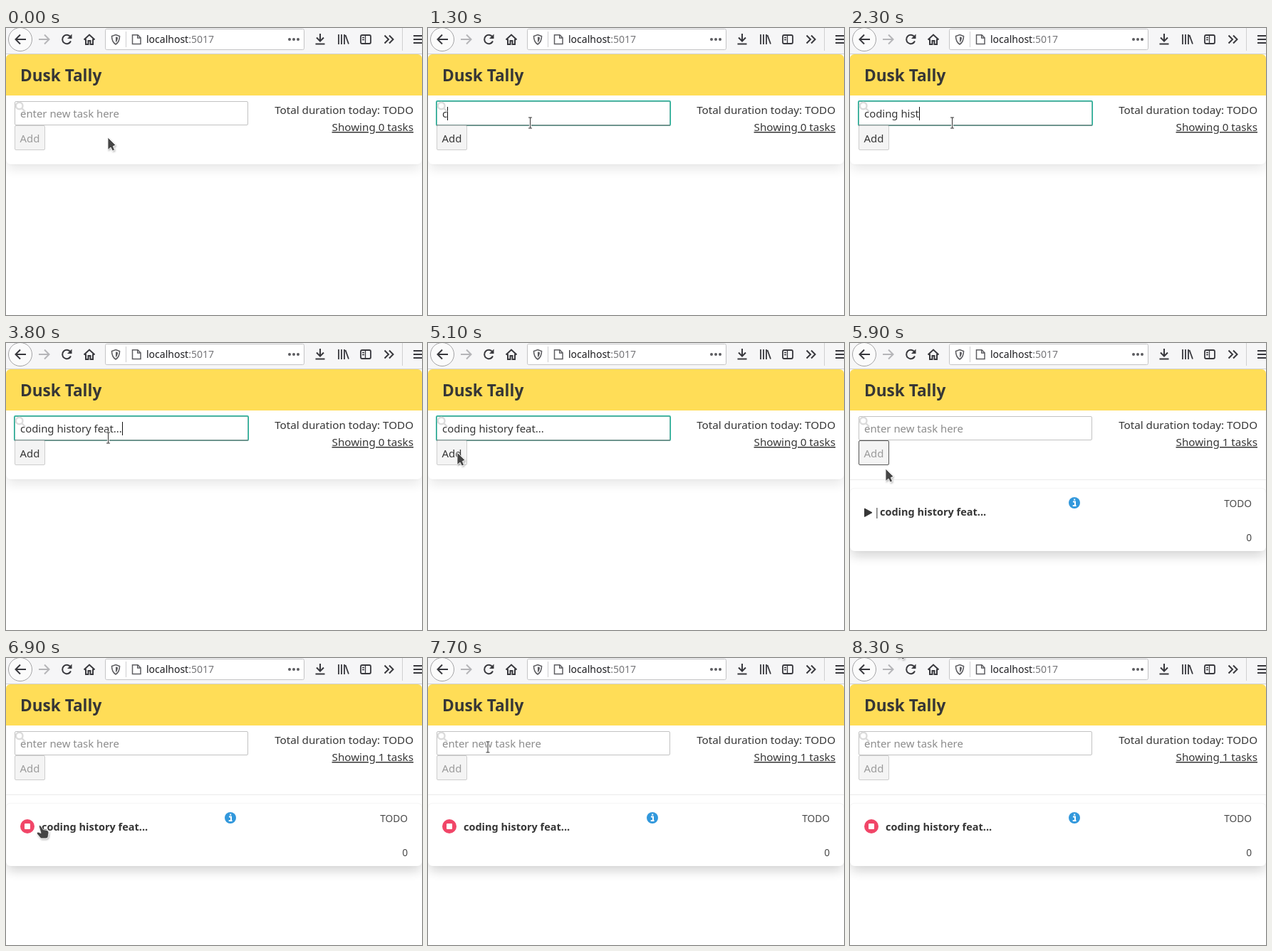
Animation, 584 px wide and 404 px high, one loop 8.6 s. Source, as an HTML page:

```html
<!DOCTYPE html>
<html lang="en">
<head>
<meta charset="utf-8">
<title>Task list</title>
<style>
  html, body { margin: 0; width: 100%; height: 100%; overflow: hidden; background: #fff; }
  svg { display: block; width: 584px; height: 404px; }
  text { font: 15.2px "Noto Sans", "Open Sans", sans-serif; fill: #363636; white-space: pre; }
  .field { font-size: 14.9px; }
  .small { font-size: 13.7px; fill: #4a4a4a; }
  .bold { font-size: 14.5px; font-weight: 700; }
  .end { text-anchor: end; }
  .icon { fill: none; stroke: #38383d; stroke-width: 2; }
</style>
</head>
<body>
<svg viewBox="0 0 584 404">
  <defs>
    <filter id="blur" x="-10%" y="-40%" width="120%" height="180%"><feGaussianBlur stdDeviation="8"/></filter>
    <filter id="soft" x="-50%" y="-50%" width="200%" height="200%">
      <feDropShadow dx="1" dy="1.5" stdDeviation="1.2" flood-opacity=".3"/>
    </filter>
  </defs>
  <rect width="584" height="404" fill="#fff"/>

  <!-- panel -->
  <rect id="shade" x="2" y="47" width="580" filter="url(#blur)" fill="#0a0a0a"/>
  <rect id="panel" y="37" width="584" rx="6" fill="#fff" stroke="#0a0a0a" stroke-opacity=".03"/>
  <path d="M0 95V43a6 6 0 0 1 6-6H578a6 6 0 0 1 6 6V95Z" fill="#ffdd57"/>
  <text x="20" y="75" style="font-size:22.6px;font-weight:600">Dusk Tally</text>
  <text class="end" x="572" y="121">Total duration today: TODO</text>
  <text id="count" class="end" x="572" y="145" text-decoration="underline"></text>

  <!-- form -->
  <rect x="12.5" y="103.5" width="327" height="33" rx="1.5" fill="#fff" stroke="#c2c2c2"/>
  <g id="focus" fill="none">
    <rect x="11.75" y="102.75" width="328.5" height="34.5" rx="1.5" stroke="#1fae96" stroke-width="1.5"/>
    <path d="M12 137H340" stroke="#7d8a88" stroke-width="1.5"/>
  </g>
  <text id="entry" class="field" x="20" y="126"></text>
  <rect id="caret" y="111" width="1" height="19" fill="#111"/>
  <g fill="none" stroke="#dbdbdb" stroke-width="2.4">
    <circle cx="18.7" cy="109.5" r="4.8"/><path d="M22.2 113 27 117.8"/>
  </g>
  <rect id="button" x="12.5" y="137.5" width="42" height="34" rx="1.5" fill="#f4f4f4"/>
  <text id="add" class="field" x="19.5" y="161">Add</text>

  <!-- task card -->
  <g id="task">
    <path d="M0 192.5H584" stroke="#ebebeb"/>
    <path d="M0 211V210a6 6 0 0 1 6-5.5H578a6 6 0 0 1 6 5.5V211" fill="none" stroke="#f5f5f5"/>
    <circle cx="315" cy="225" r="8" fill="#3298dc"/>
    <path d="M313 223.5h3v5.5M312.7 229h4.8M314.2 220.5h2" fill="none" stroke="#fff" stroke-width="2"/>
    <text class="small end" x="564" y="231">TODO</text>
    <text class="small end" x="564" y="279">0</text>
    <g id="idle">
      <path d="M20.5 233V244.5L31 238.7Z" fill="#363636" stroke="#363636" stroke-linejoin="round"/>
      <text x="34" y="242.5" style="font-size:14px">|</text>
    </g>
    <g id="running">
      <circle cx="30" cy="237" r="10" fill="#f14668"/>
      <rect x="26" y="233" width="8" height="8" rx="1" fill="#fff"/>
    </g>
    <text id="name" class="bold" y="243">coding history feat...</text>
  </g>

  <!-- browser toolbar -->
  <rect width="584" height="36" fill="#f6f6f7"/>
  <path d="M0 36.5H584" stroke="#cfcfd0"/>
  <circle cx="20" cy="16" r="16.5" fill="#fbfbfb" stroke="#a3a3a5"/>
  <path class="icon" d="M28 16H13.5M20 9.5 13.5 16 20 22.5"/>
  <path class="icon" d="M46 16H60.5M54 9.5 60.5 16 54 22.5" style="stroke:#b5b5b8"/>
  <path class="icon" d="M90.5 12.5A6.2 6.2 0 1 0 91 18.5"/>
  <path d="M92.5 8.5V15H86Z" fill="#38383d"/>
  <path class="icon" d="M109.5 16.5 117 9.5 124.500 16.5M112 15.500V23H115.500V18H118.500V23H122V15.500"/>
  <rect x="139.5" y="1.500" width="279" height="29" rx="2" fill="#fff" stroke="#c4c4c6"/>
  <path class="icon" d="M154 9.500 159.500 11.500C159.500 17 158 20.500 154 23 150 20.500 148.500 17 148.500 11.500Z" style="stroke:#5e5e62;stroke-width:1.6"/>
  <path d="M154 12.300 157 13.300C157 16.500 156 18.700 154 20.300Z" fill="#5e5e62"/>
  <path d="M168.500 5V27M556.500 0V32" stroke="#cfcfd1"/>
  <path class="icon" d="M177.500 9.700H185L189 13.700V22.500H177.500ZM184.700 10V14H189" style="stroke:#5e5e62;stroke-width:1.5"/>
  <text x="197" y="21" style="font-size:14px;fill:#1c1c1f">localhost<tspan fill="#77777a">:5017</tspan></text>
  <g fill="#5b5b5f"><circle cx="398" cy="16" r="2"/><circle cx="404" cy="16" r="2"/><circle cx="410" cy="16" r="2"/></g>
  <path class="icon" d="M441 8V18.500M436 13.500 441 18.500 446 13.500M434.500 22.500H447.500"/>
  <path class="icon" d="M467 9V23M471 9V23M475 9V23M476.500 10 481 22.500" style="stroke-width:1.8"/>
  <rect class="icon" x="498" y="10" width="14" height="12" rx="2" style="stroke-width:1.8"/>
  <path class="icon" d="M504.500 10V22M500 13.500H503M500 16.500H503" style="stroke-width:1.300"/>
  <path class="icon" d="M531.500 10.500 537 16 531.500 21.500M538 10.500 543.500 16 538 21.500"/>
  <path class="icon" d="M572 11H584M572 16H584M572 21H584"/>

  <!-- pointer -->
  <g id="pointer">
    <path id="arrow" d="M0 0V17.500L4 14 6.500 19 9.500 17.600 7.300 12.500 11 11Z" fill="#444" stroke="#fff" stroke-width=".8" filter="url(#soft)"/>
    <path id="hand" d="M-1 0Q1-1 2.500 1L5 5.500 10.500 6.500Q13 7 13 10L12 16Q11.500 18 9 18H2L-3.500 11.500Q-4 9-2 9L2 10.500Z" fill="#444" stroke="#fff" stroke-width=".8" filter="url(#soft)"/>
    <g id="beam" fill="none">
      <path d="M-3-7.500H3M-3 7.500H3M0-7.500V7.500" stroke="#fff" stroke-width="3"/>
      <path d="M-2.500-7.500H2.500M-2.500 7.500H2.500M0-7.500V7.500" stroke="#333"/>
    </g>
  </g>
</svg>
<script>
const LOOP = 8600, TICK = 100;
const TASK = 'coding history feat...';
const FOCUS = 600, CLICK_ADD = 5400, ADDED = 5500, BLUR = 6700, START = 6900;

// [time, letters typed]
const keys = [
  [1300, 1], [1400, 2], [1600, 3], [1700, 5], [1800, 6], [2000, 8], [2100, 9], [2200, 10],
  [2300, 11], [2400, 12], [2600, 15], [2900, 16], [3000, 17], [3100, 18], [3200, 19],
  [3400, 20], [3700, 21], [3800, 22]
];

// [start, ticks, control point, end point]: the pointer follows a quadratic curve
const home = [143, 154];
const moves = [
  [100, 3, [143, 143], [143.5, 133.5]],
  [4700, 3, [90, 135], [56, 150]],
  [5100, 1, [48, 152], [41, 154]],
  [5500, 5, [47, 160], [50, 177]],
  [6000, 8, [36, 250], [47, 236]],
  [7500, 7, [114, 110], [70, -30]],
  [8300, 1, [68, -20], [67, -17]]
];

const $ = id => document.getElementById(id);
const show = (id, on) => $(id).setAttribute('display', on ? 'inline' : 'none');
const set = (id, attrs) => {
  for (const k in attrs) $(id).setAttribute(k, attrs[k]);
};

function pointerAt(t) {
  let p = home;
  for (const [start, ticks, c, end] of moves) {
    if (t < start) break;
    const u = Math.min(1, (Math.floor((t - start) / TICK) + 1) / ticks), v = 1 - u;
    p = p.map((a, i) => v * v * a + 2 * u * v * c[i] + u * u * end[i]);
  }
  return p;
}

function pointerKind(t, x, y) {
  if (x > 12 && x < 340 && y > 103 && y < 137) return 'beam';
  return t > 6000 && x < 50 && y > 229 && y < 250 ? 'hand' : 'arrow';
}

function drawForm(t) {
  const focused = t >= FOCUS && t < CLICK_ADD;
  const done = t >= ADDED;
  const typed = done ? 0 : keys.reduce((n, [at, len]) => t >= at ? len : n, 0);
  const entry = $('entry');
  entry.textContent = typed ? TASK.slice(0, typed) : 'enter new task here';
  entry.style.fill = typed ? '#363636' : '#8c8c8c';
  show('focus', focused);
  show('caret', focused && t < 4300 && !(t >= 1800 && t < 2000));
  set('caret', { x: Math.round(20 + (typed ? entry.getComputedTextLength() : 0)) });
  $('add').style.fill = typed ? '#363636' : '#9b9b9b';
  set('button', { stroke: t >= CLICK_ADD && t < BLUR ? '#555' : '#cdcdcd' });
}

function drawTask(t) {
  const added = t >= ADDED, running = t >= START;
  const bottom = added ? 293 : 192;
  set('panel', { height: bottom - 37 });
  set('shade', { height: bottom - 41, opacity: added ? 0.19 : 0.1 });
  $('count').textContent = `Showing ${added ? 1 : 0} tasks`;
  show('task', added);
  show('idle', !running);
  show('running', running);
  set('name', { x: running ? 50 : 42 });
}

function render(t) {
  drawForm(t);
  drawTask(t);
  const [x, y] = pointerAt(t);
  const kind = pointerKind(t, x, y);
  for (const k of ['arrow', 'hand', 'beam']) show(k, k === kind);
  set('pointer', { transform: `translate(${x} ${y})` });
}

const begin = performance.now();
function loop() {
  render((performance.now() - begin) % LOOP);
  requestAnimationFrame(loop);
}
loop();
</script>
</body>
</html>
```
